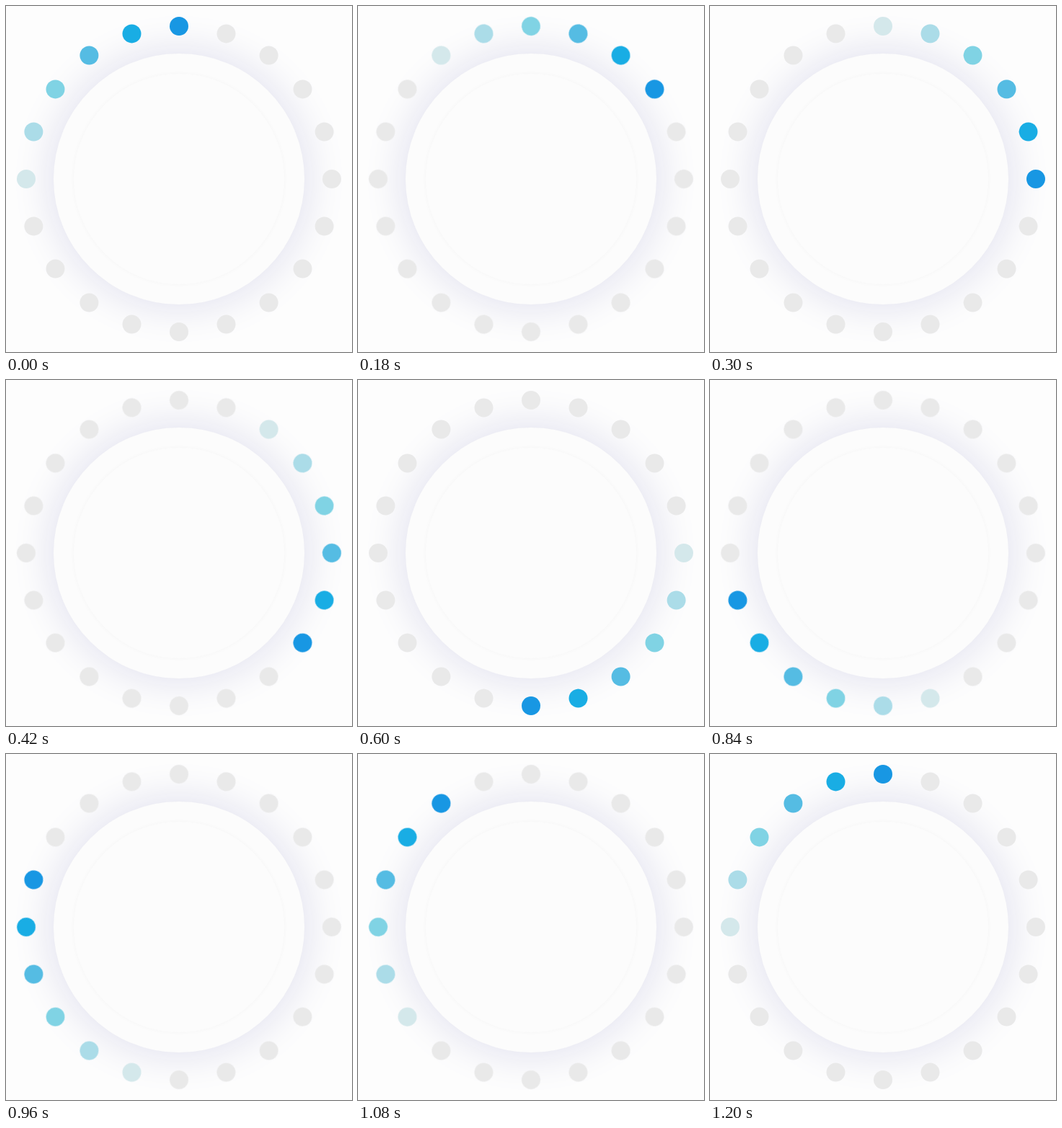
Animation, 480 px wide and 480 px high, one loop 1260 ms. Source, as an HTML page:

```html
<!DOCTYPE html>
<html lang="en">
<head>
<meta charset="utf-8">
<title>Dot ring loader</title>
<style>
  html, body {
    margin: 0;
    width: 100%;
    height: 100%;
    overflow: hidden;
    background: #fdfdfd;
  }
  .stage {
    position: relative;
    width: 480px;
    height: 480px;
    overflow: hidden;
  }
  .disc {
    position: absolute;
    border-radius: 50%;
    background: #fcfcfc;
  }
  .outer {
    inset: 66px;
    box-shadow: 0 0 60px #dcdcec;
  }
  .inner {
    inset: 94px;
    box-shadow: 0 0 6px rgba(0, 0, 0, .03);
  }
  svg {
    position: absolute;
    inset: 0;
  }
  /* 21 steps of 18deg: the last one rests on the starting pose */
  #ring {
    transform-origin: 240px 240px;
    animation: turn 1260ms steps(21, end) infinite;
  }
  @keyframes turn {
    from { transform: rotate(0deg); }
    to { transform: rotate(378deg); }
  }
</style>
</head>
<body>
<div class="stage">
  <div class="disc outer"></div>
  <div class="disc inner"></div>
  <svg width="480" height="480" viewBox="0 0 480 480"><g id="ring"></g></svg>
</div>
<script>
  const COUNT = 20, RADIUS = 212;
  const trail = ['#1897e3', '#19ade4', '#55bce3', '#80d3e4', '#abdce8', '#d4e8eb'];
  const ring = document.getElementById('ring');

  // Dots run counter-clockwise from the top, brightest first.
  for (let i = 0; i < COUNT; i++) {
    const angle = i / COUNT * 2 * Math.PI;
    const dot = document.createElementNS('http://www.w3.org/2000/svg', 'circle');
    dot.setAttribute('cx', 240 - RADIUS * Math.sin(angle));
    dot.setAttribute('cy', 240 - RADIUS * Math.cos(angle));
    dot.setAttribute('r', 13);
    dot.setAttribute('fill', trail[i] || '#e9e9e9');
    ring.append(dot);
  }
</script>
</body>
</html>
```
